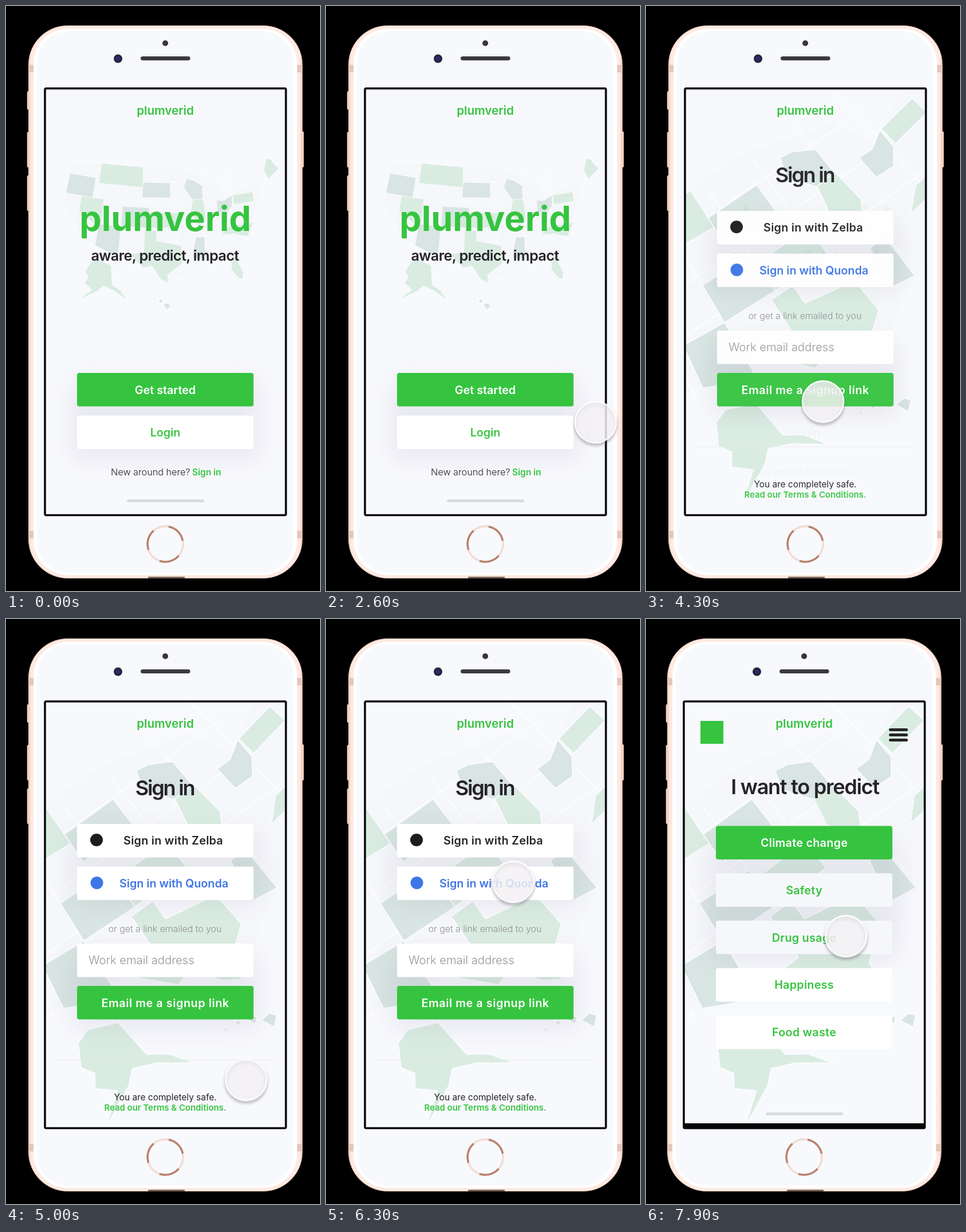
These frames come from a looping animation (548x1022 px, 8 s). An HTML page:

```html
<!DOCTYPE html>
<html lang="en">
<head>
<meta charset="utf-8">
<title>Forecast app walkthrough</title>
<style>
html, body { margin: 0; width: 100%; height: 100%; overflow: hidden; background: #000; }
svg { display: block; width: 100%; height: 100%; font-family: Inter, "Open Sans", sans-serif; }
</style>
</head>
<body>
<svg id="stage" viewBox="0 0 548 1022">
  <defs>
    <clipPath id="screenClip"><rect x="69" y="145" width="418" height="743"/></clipPath>
    <filter id="soft" x="-30%" y="-60%" width="160%" height="220%"><feGaussianBlur stdDeviation="20"/></filter>
    <filter id="blur" x="-30%" y="-30%" width="160%" height="160%"><feGaussianBlur stdDeviation="2.5"/></filter>
    <linearGradient id="rim">
      <stop offset="0" stop-color="#f4cdbe"/><stop offset=".009" stop-color="#fdeae2"/>
      <stop offset=".991" stop-color="#fdeae2"/><stop offset="1" stop-color="#f4cdbe"/>
    </linearGradient>
  </defs>
  <g id="phone">
    <g id="body"></g>
    <g clip-path="url(#screenClip)">
      <g id="map"></g>
      <g id="landing"></g>
      <g id="signIn"></g>
      <g id="topics"></g>
      <g id="brand"></g>
    </g>
    <rect x="68" y="144" width="420.5" height="745.5" rx="2" fill="none" stroke="#0b0b0d" stroke-width="3.6"/>
  </g>
  <g id="cursor">
    <circle id="touchShadow" cy="4" r="35" fill="none" stroke="#55505c" stroke-width="4" filter="url(#blur)"/>
    <circle id="touch" r="36" stroke="#fff"/>
  </g>
</svg>
<script>
const LOOP = 8000;
const GREEN = '#36c440', INK = '#252328', PAPER = '#f8f9fd', BLUE = '#3f76e6';
const MINT = '#daece2', SAGE = '#d8e5e2';
const el = id => document.getElementById(id);
const set = (id, attrs) => Object.entries(attrs).forEach(([k, v]) => el(id).setAttribute(k, v));

const rect = (x, y, w, h, fill, rx = 0, extra = '') =>
  `<rect x="${x}" y="${y}" width="${w}" height="${h}" rx="${rx}" fill="${fill}" ${extra}/>`;
const circle = (x, y, r, fill, extra = '') =>
  `<circle cx="${x}" cy="${y}" r="${r}" fill="${fill}" ${extra}/>`;
const text = (x, y, size, str, { fill = INK, weight = 600, gap = 0, anchor = 'middle' } = {}) =>
  `<text x="${x}" y="${y}" font-size="${size}" fill="${fill}" font-weight="${weight}"
    letter-spacing="${gap}" text-anchor="${anchor}">${str}</text>`;
const shadow = (y, h) => rect(112, y, 332, h, '#5b5478', 20, 'opacity=".09" filter="url(#soft)"');
const card = (y, fill = '#fff') => rect(124, y, 308, 58.5, fill, 4);
const button = (y, label, fill, color, gap = 0) =>
  card(y, fill) + text(278, y + 36.5, 19.7, label, { fill: color, gap });
const homeBar = rect(211, 862, 135, 5, '#dadbdf', 2.5);

function drawBody() {
  const key = (x, y, h) => rect(x, y, 5.5, h, '#f8d9cc', 2, 'stroke="#d9ab99" stroke-width=".6"');
  const band = (x, y) => rect(x, y, 8, 13, '#e6c6ba');
  const ring = (color, extra = '') =>
    circle(278, 940, 31, 'none', `stroke="${color}" stroke-width="3.5" ${extra}`);
  return key(37, 149, 32) + key(37, 220, 62) + key(37, 296, 62) + key(514, 219, 63)
    + rect(39.5, 34.5, 477.5, 965, 'url(#rim)', 68, 'stroke="#efc8b9"')
    + band(40, 103) + band(508, 103) + band(40, 917) + band(508, 917)
    + rect(48, 40, 460, 954, '#fff', 60)
    + rect(54, 44, 448, 946, PAPER, 56)
    + rect(248, 997, 64, 3, '#7b625a', 1)
    + circle(278, 65, 5, '#35353a')
    + circle(195.5, 92, 7.5, '#25263a') + circle(195.5, 92, 3.5, '#242c78')
    + rect(235, 88, 86.5, 7, '#3a3a3f', 3.5)
    + ring('#f0ddd4')
    + ring('#b9836e', 'pathLength="9" stroke-dasharray="1.7 1.3" transform="rotate(-79 278 940)"');
}

// Conic projection from longitude and latitude to the stage
function project([lon, lat]) {
  const angle = (lon + 98) * .45 * Math.PI / 180;
  const radius = 853 - 8.8 * (lat - 41);
  return [277 + radius * Math.sin(angle), radius * Math.cos(angle) - 500];
}
const parse = str => str.split(' ').map(pair => pair.split(',').map(Number));
const outline = str => parse(str).map(project).join(' ');
const box = (west, north, east, south) =>
  outline(`${west},${north} ${east},${north} ${east},${south} ${west},${south}`);
const land = (points, fill) =>
  `<polygon points="${points}" fill="${fill}" stroke="#fbfcfe" stroke-width=".8" stroke-linejoin="round"/>`;

function drawMap() {
  const border = (from, to) =>
    `<polyline points="${[from, to].map(project).join(' ')}" stroke="#fcfdff" stroke-width=".9"/>`;
  let borders = '';
  for (let lon = -116; lon < -80; lon += 7) borders += border([lon, 32], [lon, 48]);
  for (let lat = 37; lat < 49; lat += 4) borders += border([-120, lat], [-80, lat]);

  const mint = [
    box(-116, 49, -104, 45),
    box(-102, 40, -94.6, 37),
    box(-80, 42.6, -74.6, 40.7),
    outline('-120,42 -114,42 -114,36 -120,39'),
    outline('-90.6,42.5 -87.8,42.5 -87.5,39 -89.3,37 -91.4,40'),
    outline('-103,36.5 -100,36.5 -100,34.5 -94,33.5 -93.8,30 -97.3,27.8 -97.3,26 -99,27 -101,29.5 -103,29 -106.5,31.8 -103,32'),
    outline('-84.2,35 -81.7,36.6 -75.8,36.6 -77.8,34 -81,35'),
    outline('-70.5,46.3 -69.2,48.4 -67.9,48.3 -67.2,46.9 -66.3,46 -69.8,44.5'),
    outline('-82,30.5 -81.4,30.7 -80,27 -80.4,25.8 -81.2,26 -82.7,28')
  ];
  const sage = [
    box(-124.2, 46, -117, 42),
    box(-104, 46, -96.5, 43),
    box(-109, 41, -102, 37),
    outline('-114.5,37 -109,37 -109,31.7 -111,31.5 -114.8,32.7'),
    outline('-92,46.7 -90.3,46.4 -87.8,45.2 -87.9,42.5 -90.7,42.5 -92.8,45'),
    outline('-84.4,42 -82.5,41.8 -80.2,42.6 -80.4,40.6 -82,39.3 -84.4,39.6'),
    outline('-90.3,35 -88.2,35 -88.4,30.4 -91.5,31 -91,33')
  ];
  const country = outline('-124,48 -95,49 -84,46 -82,42 -71,45 -76,37 -81,31 -90,30 -97,26 -106,32 -117,33 -124,40');
  const alaska = '148,447 160,443 183,453 186,487 200,497 212,515 188,497 170,489 160,498 125,514 150,496 137,484 144,474 138,464';

  // Islands grow along a slanted chain
  let islands = '';
  for (let i = 0; i < 4; i++) {
    const x = 248 + i * 11, y = 509 + i * i * 1.7, r = 1.6 + i * i * .5;
    islands += land([[x - r, y - r * .7], [x + r * .4, y - r * .8], [x + r, y], [x - r * .2, y + r]].join(' '), SAGE);
  }
  return `<polygon points="${country}" fill="#f6f7fb"/>` + borders
    + mint.map(p => land(p, MINT)).join('') + sage.map(p => land(p, SAGE)).join('')
    + land(alaska, MINT) + islands;
}

function drawLanding() {
  return shadow(650, 145)
    + text(278, 393, 61, 'plumverid', { fill: GREEN, weight: 700 })
    + text(277.5, 445, 25.2, 'aware, predict, impact', { gap: -.6 })
    + button(641, 'Get started', GREEN, '#fff')
    + button(715.5, 'Login', '#fff', GREEN)
    + text(183, 820, 16.2, 'New around here?', { weight: 300, anchor: 'start' })
    + text(325, 820, 15.4, 'Sign in', { fill: GREEN, anchor: 'start' })
    + homeBar;
}

function drawSignIn() {
  return shadow(370, 130) + shadow(580, 140)
    + text(277, 308, 36, 'Sign in', { gap: -2.2 })
    + card(358) + circle(158, 386, 11, '#1d1d1f')
    + text(292, 394, 19.7, 'Sign in with Zelba', { gap: .3 })
    + card(432.5) + circle(158.5, 461, 11, BLUE)
    + text(293, 468.5, 19.7, 'Sign in with Quonda', { fill: BLUE })
    + text(277.5, 546.5, 15.8, 'or get a link emailed to you', { fill: '#8d8d93', weight: 300 })
    + card(567)
    + text(144, 603, 20.2, 'Work email address', { fill: '#96969b', weight: 300, anchor: 'start' })
    + button(641, 'Email me a signup link', GREEN, '#fff', .6)
    + rect(88, 769.5, 380, 1, '#e8eaee')
    + text(278, 841, 15.4, 'You are completely safe.', { weight: 400 })
    + text(278, 859, 14.9, 'Read our Terms &amp; Conditions.', { fill: GREEN });
}

function drawTopics() {
  const topics = ['Climate change', 'Safety', 'Drug usage', 'Happiness', 'Food waste'];
  const fillOf = i => i === 0 ? GREEN : i < 3 ? '#f6f7fb' : '#fff';
  return shadow(385, 210)
    + rect(97, 178, 40, 40, GREEN)
    + [191, 200, 209].map(y => rect(426, y, 33, 5, INK, 2.5)).join('')
    + text(279.5, 306, 36, 'I want to predict', { gap: -1.25 })
    + topics.map((label, i) =>
        button(361.5 + i * 82.8, label, fillOf(i), i ? GREEN : '#fff', .3)).join('')
    + homeBar + rect(66, 881, 424, 8, '#050506');
}

el('body').innerHTML = drawBody();
el('map').innerHTML = drawMap();
el('landing').innerHTML = drawLanding();
el('signIn').innerHTML = drawSignIn();
el('topics').innerHTML = drawTopics();
el('brand').innerHTML = text(278, 190, 20.6, 'plumverid', { fill: GREEN });

const mix = (a, b, k) => a + (b - a) * k;
const ease = (t, from, to) => {
  const u = Math.min(1, Math.max(0, (t - from) / (to - from)));
  return u * u * (3 - 2 * u);
};

// Each move: start, end, target x, target y
const moves = [[2100, 3150, 307, 689], [4250, 4900, 419, 805], [5050, 6050, 327, 459], [7200, 7850, 349, 554]];
const cursorAt = t => moves.reduce(([x, y], [from, to, tx, ty]) => {
  const k = ease(t, from, to);
  return [mix(x, tx, k), mix(y, ty, k)];
}, [613, 760]);
const tap = (t, at) => ease(t, at - 150, at) - ease(t, at + 150, at + 300);

function render(t) {
  const zoom = ease(t, 3950, 4350);
  const next = ease(t, 6500, 6750);
  set('phone', { transform: `translate(${t >= 6500 ? -2 : 0} 0)` });
  set('map', {
    transform: `translate(${mix(275, 287, zoom)} ${mix(400, 490, zoom)}) rotate(${-37 * zoom}) scale(${mix(1, 2.2, zoom)}) translate(-275 -400)`
  });
  set('landing', { opacity: 1 - zoom });
  set('signIn', { opacity: zoom * (1 - next) });
  set('topics', { opacity: next });

  const press = tap(t, 3750) + tap(t, 6450);
  set('cursor', { transform: `translate(${cursorAt(t).join(' ')})` });
  set('touchShadow', { opacity: mix(.5, 0, press) });
  set('touch', {
    fill: press > .5 ? '#fff' : '#f3f1f4',
    'fill-opacity': mix(.84, .4, press),
    'stroke-opacity': mix(.95, .55, press),
    'stroke-width': mix(2.5, 1.5, press)
  });
}

const start = performance.now();
function tick() {
  render((performance.now() - start) % LOOP);
  requestAnimationFrame(tick);
}
tick();
</script>
</body>
</html>
```
